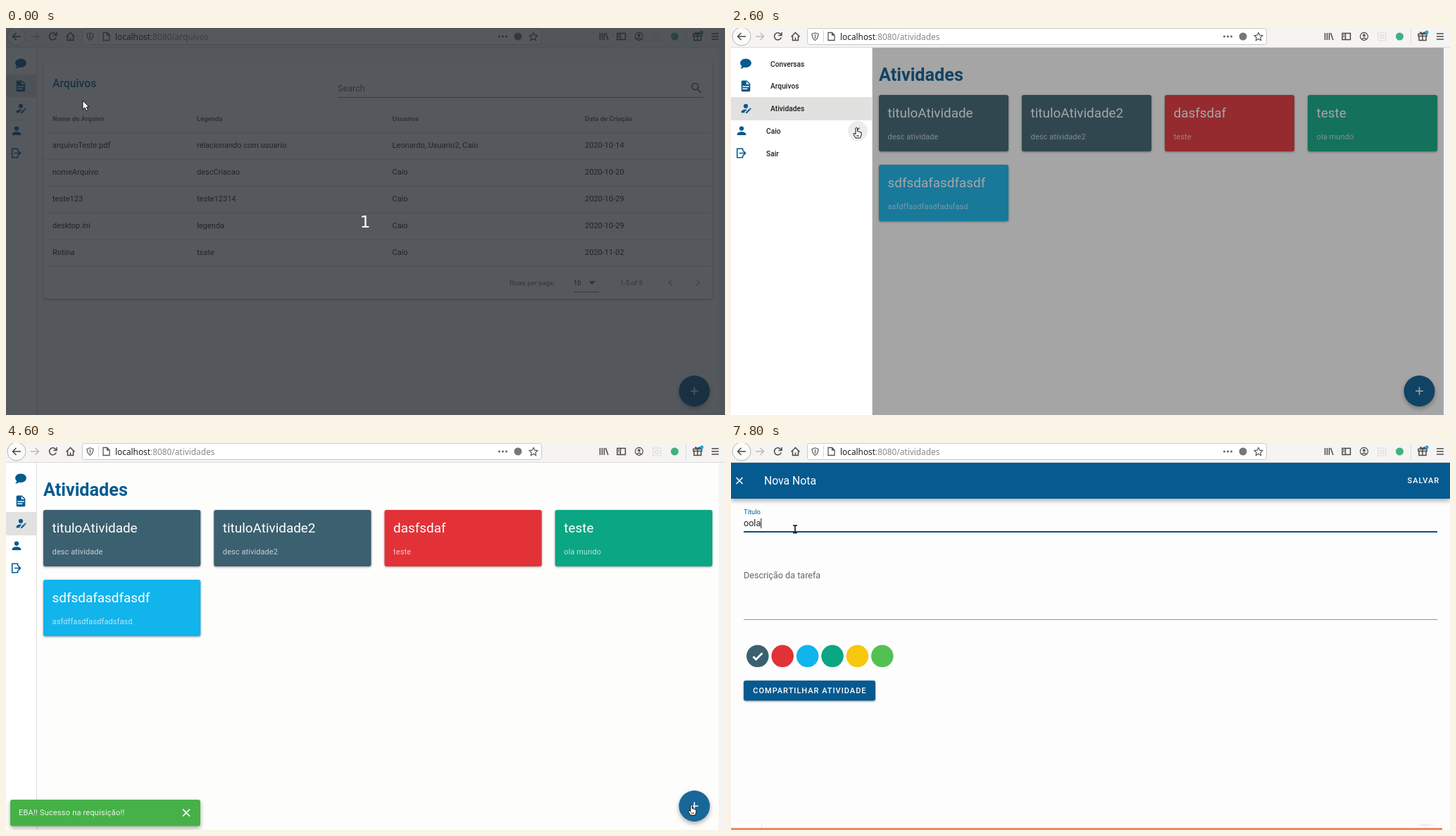
Animation of 1021 by 549 pixels, one loop 8 s. Source, as an HTML page:

```html
<!DOCTYPE html>
<html lang="pt">
<head>
<meta charset="utf-8">
<title>Atividades</title>
<style>
html, body { margin: 0; width: 100%; height: 100%; overflow: hidden; background: #fdfdfc; }
svg { display: block; width: 1021px; height: 549px; font-family: Roboto, sans-serif; }
.b { font-weight: 700; }
.m { font-weight: 500; }
.caps { font-weight: 500; letter-spacing: .98px; }
.lift { filter: drop-shadow(0 1px 1.5px rgba(0,0,0,.4)); }
.float { filter: drop-shadow(0 3px 3px rgba(0,0,0,.32)); }
.line { fill: none; stroke: #4a4a4a; stroke-width: 1.5; }
.url { font: 11.85px "Noto Sans", sans-serif; }
</style>
</head>
<body>
<svg id="stage" viewBox="0 0 1021 549"></svg>
<script>
const BLUE = '#055a90', INK = '#212121', GREY = '#666';
const SLATE = '#3b6070', RED = '#e23237', SKY = '#12b4ec', TEAL = '#0ba683';

const ICON = {
  chat: 'M12 3C17.5 3 22 6.58 22 11S17.5 19 12 19C10.8 19 9.6 18.8 8.5 18.5C5.5 21 2 21 2 21C4.3 18.7 4.7 17.1 4.8 16.5C3 15 2 13.1 2 11C2 6.6 6.5 3 12 3Z',
  file: 'M13 9H18.5L13 3.5V9M6 2H14L20 8V20A2 2 0 0 1 18 22H6A2 2 0 0 1 4 20V4A2 2 0 0 1 6 2M15 18V16H6V18H15M18 14V12H6V14H18Z',
  edit: 'M21.7 13.4L20.7 14.4L18.6 12.3L19.6 11.3Q20 10.9 20.4 11.3L21.7 12.6Q22 13 21.7 13.4M12 18.9L18 12.9L20.1 14.9L14 21H12ZM12 14C7.6 14 4 15.8 4 18V20H10V18.1L14 14.1Q13 14 12 14M12 4A4 4 0 0 0 12 12A4 4 0 0 0 12 4Z',
  user: 'M12 4A4 4 0 0 1 12 12A4 4 0 0 1 12 4M12 14C16.4 14 20 15.8 20 18V20H4V18C4 15.8 7.6 14 12 14Z',
  exit: 'M3 3H15V8H13V5H5V19H13V16H15V21H3ZM8 11H16.5L14 8.5L15.5 7L20.5 12L15.5 17L14 15.5L16.5 13H8Z'
};

const text = (x, y, s, size, fill = INK, more = '') =>
  `<text x="${x}" y="${y}" font-size="${size}" fill="${fill}" ${more}>${s}</text>`;
const rect = (x, y, w, h, fill, more = '') =>
  `<rect x="${x}" y="${y}" width="${w}" height="${h}" fill="${fill}" ${more}/>`;
const disc = (x, y, r, fill, more = '') =>
  `<circle cx="${x}" cy="${y}" r="${r}" fill="${fill}" ${more}/>`;
const path = (d, more = 'class="line"') => `<path d="${d}" ${more}/>`;
const icon = (name, x, y) =>
  `<path d="${ICON[name]}" fill="${BLUE}" transform="translate(${x - 9.45} ${y - 9.45}) scale(.788)"/>`;
const stroke = (color, width) => `fill="none" stroke="${color}" stroke-width="${width}"`;

// Files page
const columns = [66, 271, 548.5, 822];
const files = [
  ['arquivoTeste.pdf', 'relacionando com usuario', 'Leonardo, Usuario2, Caio', '2020-10-14'],
  ['nomeArquivo', 'descCriacao', 'Caio', '2020-10-20'],
  ['teste123', 'teste12314', 'Caio', '2020-10-29'],
  ['desktop.ini', 'legenda', 'Caio', '2020-10-29'],
  ['Rotina', 'tsate', 'Caio', '2020-11-02']
];
const filesPage = () => {
  let s = rect(53, 47, 950, 337, '#fff', 'rx="3" class="lift"') +
    text(66, 84, 'Arquivos', 15.76, BLUE, 'class="m"') +
    text(471, 90, 'Search', 12.6, GREY) +
    path('M471 98.5H990', stroke('#888', 1)) +
    path('M982 87L987 92M983 83A4.5 4.5 0 1 1 974 83A4.5 4.5 0 1 1 983 83', stroke('#555', 1.7));
  ['Nome do Arquivo', 'Legenda', 'Usuarios', 'Data de Criação'].forEach((h, i) =>
    s += text(columns[i], 132, h, 9.45, GREY, 'class="b"'));
  files.forEach((row, r) => {
    const y = 170 + r * 38;
    s += path(`M53 ${y - 21.5}H1003`, stroke('#ddd', 1));
    row.forEach((cell, i) => s += text(columns[i], y, cell, 11.03));
  });
  return s + path('M53 337.5H1003', stroke('#ddd', 1)) +
    text(715, 365, 'Rows per page:', 9.45, GREY) + text(806, 365, '10', 9.45) +
    path('M806 374.5H842', stroke('#888', 1)) + path('M828 359H837L832 364Z', 'fill="#666"') +
    text(872, 365, '1-5 of 5', 9.45, GREY) +
    path('M945.5 357L941.5 361L945.5 365M980.5 357L984.5 361L980.5 365', stroke('#aaa', 1.5));
};

// Notes page
const notes = [
  ['tituloAtividade', 'desc atividade', SLATE], ['tituloAtividade2', 'desc atividade2', SLATE],
  ['dasfsdaf', 'teste', RED], ['teste', 'ola mundo', TEAL], ['sdfsdafasdfasdf', 'asfdffasdfasdfadsfasd', SKY]
];
const note = ([title, desc, color]) => `<g class="note">` +
  rect(0, 0, 200, 80, color, 'rx="3" class="lift"') + text(12.6, 32, title, 18.9, '#fff') +
  text(12.6, 63, desc, 11.03, 'rgba(255,255,255,.7)', 'letter-spacing=".08"') + '</g>';

// Side menu
const menu = [
  ['chat', 'Conversas', 21, 56], ['file', 'Arquivos', 21, 56], ['edit', 'Atividades', 21, 56],
  ['user', 'Caio', 15, 50], ['exit', 'Sair', 15, 50]
];
const menuY = i => 50.5 + i * 31.75;
const drawer = () => rect(0, 28, 43, 521, '#fff', 'id="side"') +
  rect(0, 66, 43, 32, '#e1e1e0', 'id="row"') +
  disc(22, 117, 0, '#000', 'id="ripple" clip-path="url(#rowClip)"') +
  path('', 'id="edge" ' + stroke('#e0e0e0', 1)) +
  menu.map((m, i) => icon(m[0], m[2], menuY(i))).join('') +
  '<g id="labels">' + menu.map((m, i) => text(m[3], menuY(i) + 4, m[1], 10.24, INK, 'class="m"')).join('') +
  '<g id="chevron">' + disc(0, 146, 14, '#ececec', 'id="halo"') +
  path('M2.5 141.5L-2 146L2.5 150.5', stroke('#555', 1.5)) + '</g></g>';

// New note dialog
const dialog = () => rect(0, 28, 1021, 513, '#fdfdfd') +
  rect(0, 28, 1021, 51, BLUE, 'class="float"') +
  path('M7.5 49L16.5 58M16.5 49L7.5 58', stroke('#fff', 1.6)) +
  text(47, 59, 'Nova Nota', 15.76, '#fff') + text(960.5, 57, 'SALVAR', 11.03, '#fff', 'class="caps"') +
  text(18, 118, 'Título', 12.6, GREY, 'id="label"') +
  text(18, 118, '', 12.6, INK, 'id="typed"') +
  path('M0 107V121', 'id="caret" stroke="#222"') +
  path('M18 126H1003', 'id="lineA"') +
  text(18, 192, 'Descrição da tarefa', 12.6, GREY) + path('M18 250.5H1003', 'id="lineB"') +
  [SLATE, RED, SKY, TEAL, '#f8c70f', '#52c152'].map((c, i) => disc(37.8 + i * 35.4, 302.3, 15.8, c)).join('') +
  path('M31.5 303L35.5 307L44.5 298', stroke('#fff', 2.8)) +
  rect(18, 337, 187, 28.5, BLUE, 'rx="3" class="lift"') +
  text(31.3, 355, 'COMPARTILHAR ATIVIDADE', 11.03, '#fff', 'class="caps"');

// Browser bar
const browser = () => rect(0, 0, 1021, 28, '#f5f4f2') + rect(0, 27, 1021, 1, '#dddbd8') +
  disc(15, 12, 13, '#fbfbfa', 'stroke="#b5b3b0"') +
  path('M21 12H9.5M14.5 7L9.5 12L14.5 17') +
  path('M35 12H46.5M41.5 7L46.5 12L41.5 17', stroke('#bbb', 1.5)) +
  path('M71 9.5A5 5 0 1 0 71.3 13.5M72 6V10.5H67.5') +
  path('M85.5 12.5L91.5 6.5L97.5 12.5M87.5 11.5V17.5H95.5V11.5M91.5 17V13.5') +
  rect(108.5, .5, 652, 23, '#fff', 'rx="3" stroke="#cbc9c6"') +
  path('M119.5 7L124 8.5C124 13 122.5 15.5 119.5 17.5C116.5 15.5 115 13 115 8.5ZM119.5 9V15', stroke('#666', 1.3)) +
  path('M131.5 4V20', stroke('#d5d5d5', 1)) +
  path('M138 6.5H143.5L147 10V17.5H138ZM143.5 6.5V10H147', stroke('#555', 1.3)) +
  '<text class="url" x="155" y="16.5" fill="#222">localhost<tspan id="route" fill="#888"></tspan></text>' +
  [700.5, 705.5, 710.5].map(x => disc(x, 12, 1.5, '#666')).join('') +
  disc(727, 12, 5.5, '#777') +
  path('M749 6.5L750.8 10.2L754.8 10.7L751.9 13.5L752.6 17.5L749 15.5L745.4 17.5L746.1 13.5L743.2 10.7L747.2 10.2Z', stroke('#555', 1.2)) +
  path('M843.5 7V17M846.5 7V17M849.5 7V17M851.5 7L855 17') +
  path('M868 7.5H879.5V16.5H868ZM872.5 7.5V16.5M869.5 10H871M869.5 12.5H871') +
  path('M904.5 12A5.5 5.5 0 1 1 893.5 12A5.5 5.5 0 1 1 904.5 12M895.5 16Q899 12.5 902.5 16', stroke('#555', 1.3)) +
  disc(899, 10.5, 2, '#555') +
  path('M919 7H930V18H919Z', stroke('#d2d2d0', 1.2) + ' stroke-dasharray="2 1"') + disc(924.5, 12.5, 2.5, 'none', 'stroke="#d2d2d0"') +
  disc(949.5, 12, 5.5, '#3fb27f') +
  path('M965.5 1V24', stroke('#dddbd8', 1)) +
  path('M976 8.5H988V11.5H976ZM977 11.5V17.5H987V11.5M982 8V17.5M982 8Q978 4 979 8M982 8Q986 4 985 8') +
  disc(988, 6, 2.5, '#19a9e0') +
  path('M1002 8H1012M1002 12H1012M1002 16H1012');

const pointers = () => {
  const skin = 'fill="#fff" stroke="#111" stroke-linejoin="round" ';
  return path('M0 0V12.5L3 9.8L5 14.5L7.4 13.5L5.3 9H9Z', skin + 'id="arrow"') +
    path('M-1 0Q.5 -1.5 1.5 0V4.5L7 6V10L5.5 14H-1L-4 9Q-4.5 7 -2.5 7.5L-1 9ZM1 10V12M3 10V12', skin + 'id="hand"') +
    path('M-3 -5H3M0 -5V5.5M-3 5.5H3', stroke('#111', 1.6) + ' id="beam"');
};

const stage = document.getElementById('stage');
stage.innerHTML = `<defs><clipPath id="rowClip"><rect id="rowBox" y="98" width="43" height="32"/></clipPath></defs>` +
  rect(0, 0, 1021, 549, '#fdfdfc') +
  `<g id="files">${filesPage()}</g>` +
  `<g id="notes">${text(0, 75, 'Atividades', 25.2, BLUE, 'class="b" id="heading"')}<g id="cards">${notes.map(note).join('')}</g></g>` +
  `<g id="fab">${disc(977.5, 515, 22, BLUE, 'class="float"')}${disc(977.5, 515, 22, '#fff', 'id="glow"')}` +
  path('M972 515H983M977.5 509.5V520.5', stroke('#fff', 1.6)) + '</g>' +
  rect(0, 28, 1012, 521, '#212121', 'id="shade"') +
  rect(1012, 28, 9, 521, '#f5f4f2', 'id="scroll"') +
  `<circle id="spin" cx="506" cy="288.5" r="24.3" pathLength="125.66" ${stroke('#fff', 3)}/>` +
  `<g id="drawer">${drawer()}</g><g id="dialog">${dialog()}</g>` +
  rect(0, 546, 1010, 3, '#f0876a', 'id="strip"') +
  `<g id="toast">${rect(6, 506, 270, 37.5, '#46b148', 'rx="3" class="float"')}` +
  text(18, 528, 'EBA!! Sucesso na requisição!!', 11.03, 'rgba(255,255,255,.88)', 'letter-spacing=".2"') +
  path('M251 519.5L261 529.5M261 519.5L251 529.5', stroke('#fff', 1.6)) + '</g>' +
  browser() +
  `<g id="veil">${rect(0, 0, 1021, 549, '#20252c', 'opacity=".76"')}` +
  text(510, 283, '1', 23, '#fff', 'text-anchor="middle" style="font-family:\'DejaVu Sans\',sans-serif"') + '</g>' +
  `<g id="pointer">${pointers()}</g>`;

const el = {};
stage.querySelectorAll('[id]').forEach(n => el[n.id] = n);
const cards = [...stage.querySelectorAll('.note')];
const set = (n, attrs) => { for (const k in attrs) n.setAttribute(k, attrs[k]); };
const show = (n, on) => { n.style.display = on ? '' : 'none'; };

// Timelines: [ms, values...]
const WIDTH = [[800, 43], [1000, 194], [1100, 200], [2700, 200], [2800, 197], [2900, 120], [3000, 58], [3100, 43]];
const SHADE = [[900, 0], [1000, .41], [1100, .46], [2500, .46], [2600, .4], [2700, .22], [2800, .045], [2900, 0]];
const RIPPLE = [[900, 0, .19], [1000, 27, .19], [1200, 110, .16], [1400, 190, .06], [1500, 200, 0]];
const SLIDE = [[5100, 521], [5200, 420], [5300, 230], [5400, 88], [5500, 20], [5600, 0]];
const TOAST = [[7500, 1], [7600, .5], [7700, 0]];
const MOUSE = [
  [100, 109, 103], [300, 90, 106], [500, 48, 111], [700, 22, 115], [1000, 21, 115], [1900, 21, 115],
  [2200, 95, 128], [2500, 175, 142], [2600, 178, 142], [2800, 177, 143], [3000, 260, 170], [3300, 560, 270],
  [3600, 774, 356], [3800, 850, 430], [4100, 921, 507], [4200, 921, 507], [4500, 968, 513], [4600, 973, 514],
  [5000, 973, 514], [5200, 970, 512], [5400, 964, 510], [5600, 800, 415], [5800, 540, 272], [6100, 260, 40],
  [6200, 260, 40], [6500, 140, 338], [6800, 91, 122]
];
const at = (keys, t) => {
  const i = keys.findIndex(k => k[0] > t);
  if (i === 0) return keys[0].slice(1);
  if (i < 0) return keys[keys.length - 1].slice(1);
  const a = keys[i - 1], b = keys[i], p = (t - a[0]) / (b[0] - a[0]);
  return a.slice(1).map((v, n) => v + (b[n + 1] - v) * p);
};
const ease = x => x < .5 ? 2 * x * x : 1 - 2 * (1 - x) ** 2;

function spinner(t) {
  const p = ((t - 850) / 1400) % 1, e = ease(p * 2 % 1);
  const dash = p < .5 ? 1 + 99 * e : 100;
  const skip = p < .5 ? 15 * e : 15 + 110 * e;
  set(el.spin, {
    'stroke-dasharray': `${dash} 200`, 'stroke-dashoffset': -skip,
    transform: `rotate(${p * 360} 506 288.5)`
  });
}

function pointer(t, x, y, open) {
  const field = open && ((y > 92 && y < 128) || (y > 165 && y < 251));
  const link = !open && t > 100 && (
    (t < 2800 && x < 200 && (t >= 1000 || x < 43)) || Math.hypot(x - 977.5, y - 515) < 22);
  show(el.beam, field);
  show(el.hand, link);
  show(el.arrow, !field && !link);
  set(el.pointer, { transform: `translate(${x} ${y})` });
}

function draw(t) {
  const [w] = at(WIDTH, t), [x, y] = at(MOUSE, t), [drop] = at(SLIDE, t);
  const moved = t >= 800, open = t >= 5200, focus = t >= 7000;

  show(el.veil, t < 100);
  el.route.textContent = moved ? ':8080/atividades' : ':8080/arquivos';
  show(el.files, !moved);
  show(el.notes, moved);
  show(el.cards, t >= 2500);

  const left = w + 10, size = ((open ? 1012 : 1003) - left - 57) / 4;
  set(el.heading, { x: left });
  cards.forEach((c, i) => {
    set(c, { transform: `translate(${left + i % 4 * (size + 19)} ${i < 4 ? 95 : 194})` });
    set(c.firstChild, { width: size });
  });

  set(el.shade, { opacity: at(SHADE, t)[0] });
  show(el.spin, t >= 1000 && t < 2500);
  spinner(Math.max(t, 850));
  show(el.scroll, !open);
  set(el.fab, { transform: `translate(${open ? 9 : 0} 0)` });
  set(el.glow, { opacity: open || t < 4400 ? 0 : t < 5000 ? .08 : .2 });

  set(el.side, { width: w });
  set(el.row, { width: w, y: moved ? 98 : 66 });
  set(el.rowBox, { width: w });
  set(el.edge, { d: `M0 130.5H${w}M${w + .5} 28V549` });
  const [r, ink] = at(RIPPLE, t);
  set(el.ripple, { r, opacity: ink });
  show(el.labels, t >= 1000 && t < 2800);
  set(el.chevron, { transform: `translate(${w - 20} 0)` });
  show(el.halo, t >= 2500);

  show(el.dialog, open);
  set(el.dialog, { transform: `translate(0 ${drop})` });
  show(el.strip, t >= 5600);
  set(el.label, focus ? { y: 101, 'font-size': 9.45, fill: BLUE } : { y: 118, 'font-size': 12.6, fill: GREY });
  const typed = 'oola'.slice(0, Math.max(0, (t - 7400) / 100));
  el.typed.textContent = typed;
  show(el.caret, focus);
  set(el.caret, { transform: `translate(${18.5 + (typed && open ? el.typed.getComputedTextLength() : 0)} 0)` });
  const over = (a, b) => open && y > a && y < b ? '#333' : '#949494';
  set(el.lineA, { stroke: focus ? '#0a4f80' : over(92, 128), 'stroke-width': focus ? 2 : 1 });
  set(el.lineB, { stroke: over(165, 251), 'stroke-width': 1 });

  show(el.toast, t >= 2800);
  set(el.toast, { opacity: at(TOAST, t)[0] });
  pointer(t, x, y, open);
}

const start = performance.now();
function tick() {
  draw(Math.floor((performance.now() - start) % 8000 / 100) * 100);
  requestAnimationFrame(tick);
}
tick();
</script>
</body>
</html>
```
